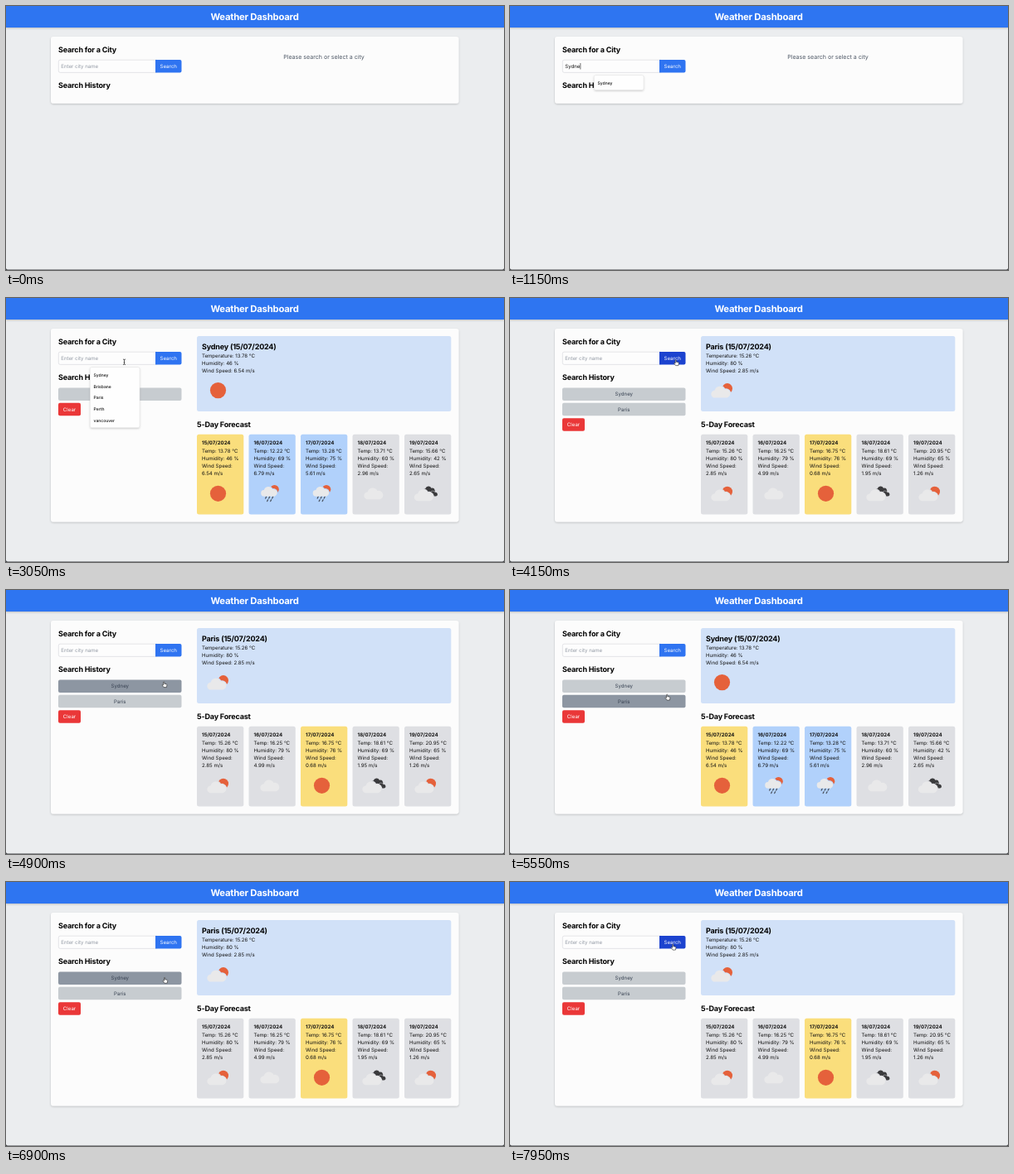
These frames come from a looping animation (600 by 319 pixels, 8 s). An HTML page:

```html
<!DOCTYPE html>
<html lang="en">
<head>
<meta charset="utf-8">
<title>Weather Dashboard</title>
<style>
  html, body { margin: 0; width: 100%; height: 100%; overflow: hidden; background: #3a3c40; }
  svg { display: block; width: 100vw; height: 100vh; }
  text { font: 400 6.1px Inter, Roboto, sans-serif; fill: #111; text-rendering: geometricPrecision; white-space: pre; }
  .title { font-size: 11.3px; font-weight: 700; fill: #fff; letter-spacing: -.02em; }
  .head { font-size: 9px; font-weight: 700; fill: #000; letter-spacing: -.02em; }
  .day { font-weight: 700; }
  .hint { font-size: 7.05px; fill: #4b5563; }
  .placeholder { fill: #9299a4; }
  .light { fill: #fff; }
  .past { fill: #374151; }
  .option { font-size: 5px; font-weight: 500; }
  .mid { text-anchor: middle; }
</style>
</head>
<body>
<svg viewBox="0 0 600 319" preserveAspectRatio="none">
  <defs>
    <filter id="soft" x="-10%" y="-10%" width="120%" height="130%">
      <feDropShadow dx="0" dy="1" stdDeviation="1" flood-opacity=".2"/>
    </filter>
    <path id="cloud" d="M-7.5 7a4.5 4.5 0 0 1-.3-9A6.3 6.3 0 0 1 4-3.2 5.2 5.2 0 0 1 7 7Z"/>
  </defs>
  <path d="M0 0H600V316.500Q600 318.500 598 318.500H2Q0 318.500 0 316.500Z" fill="#ebedef"/>
  <rect width="600" height="26" fill="#2f74f1" filter="url(#soft)"/>
  <text class="title mid" x="299.500" y="17.400">Weather Dashboard</text>
  <g id="scene"></g>
  <g id="caret"><rect y="69" width=".6" height="7.500" fill="#111"/></g>
  <g id="menu"></g>
  <g id="pointer">
    <path data-kind="arrow" d="M-2.500-4V4L-.7 2.400.6 5.200 1.800 4.700.6 2H3Z" fill="#000" stroke="#fff" stroke-width=".6"/>
    <path data-kind="beam" d="M-1.500-3Q0-3 0-2Q0-3 1.500-3M0-2V2.500M-1.500 3.500Q0 3.500 0 2.500Q0 3.500 1.500 3.500M-.8.8H.8" fill="none" stroke="#222" stroke-width=".7"/>
    <path data-kind="hand" d="M-1.300.5V-3Q-.8-3.900-.2-3V-.8L2.300-.3Q3.100 0 2.900 1L2.400 3.600H-.9L-2.900.9Q-2.700-.3-1.300.8Z" fill="#fff" stroke="#222" stroke-width=".6"/>
  </g>
</svg>
<script>
const LOOP = 8000;
const $ = id => document.getElementById(id);
const CITIES = ['Sydney', 'Brisbane', 'Paris', 'Perth', 'vancouver'];

// Each day: temperature, humidity, wind, sky
const WEATHER = {
  Sydney: [['13.78', 46, '6.54', 'sun'], ['12.22', 69, '6.79', 'rain'], ['13.28', 75, '5.61', 'rain'],
           ['13.71', 60, '2.96', 'cloud'], ['15.66', 42, '2.65', 'broken']],
  Paris: [['15.26', 80, '2.85', 'few'], ['16.25', 79, '4.99', 'cloud'], ['16.75', 76, '0.68', 'sun'],
          ['18.61', 69, '1.95', 'broken'], ['20.95', 65, '1.26', 'few']]
};
const RESULTS = [[0, null], [2200, 'Sydney'], [4000, 'Paris'], [5200, 'Sydney'], [6420, 'Paris']];
const TYPING = [
  { word: 'Sydney', focus: 700, start: 960, step: 45, end: 2200 },
  { word: 'Paris', focus: 2940, start: 3110, step: 60, end: 4000 }
];
// time, x, y
const PATH = [[50, 602, 316], [650, 140, 76], [1400, 140, 76], [1850, 196, 77], [2350, 196, 77], [2850, 142.5, 77],
  [3520, 142.5, 77], [3820, 200.5, 78], [4300, 200.5, 78], [4800, 191, 114], [5300, 191, 114], [5700, 189.5, 136.5],
  [6550, 189.5, 136.5], [7500, 197, 78.5], [LOOP, 197, 78.5]];
const HIDDEN = [[0, 50], [960, 1400], [3110, 3520]];

const text = (x, y, str, cls = '') => `<text x="${x}" y="${y}" class="${cls}">${str}</text>`;
const box = (x, y, w, h, fill, r = 2.5, extra = '') =>
  `<rect x="${x}" y="${y}" width="${w}" height="${h}" rx="${r}" fill="${fill}" ${extra}/>`;
const sun = (x, y, r) => `<circle cx="${x}" cy="${y}" r="${r}" fill="#e5613b"/>`;
const cloud = (x, y, scale, fill, edge) =>
  `<use href="#cloud" transform="translate(${x} ${y}) scale(${scale})" fill="${fill}" stroke="${edge}" stroke-width="2" style="paint-order:stroke"/>`;

function icon(kind, x, y, bg) {
  const pale = '#e9e9ea';
  const drops = [[-5, 4], [-1, 4], [3, 4], [-3, 7.5], [1, 7.5]]
    .map(([dx, dy]) => `M${dx + .6} ${dy}l-.9 1.800`).join('');
  const parts = {
    sun: () => sun(0, 0, 9.6),
    few: () => sun(6.3, -2.3, 6.2) + cloud(-1, 2, 1, pale, bg),
    cloud: () => cloud(.5, 0, 1, pale, 'none'),
    broken: () => cloud(4.5, -4.5, .62, '#3b3b3d', 'none') + cloud(9.5, 0, .45, '#3b3b3d', bg) + cloud(-1.5, 2, 1, pale, bg),
    rain: () => sun(5.5, -5, 5.3) + cloud(-.5, -2.5, .85, pale, bg) +
      `<path d="${drops}" stroke="#444a55" stroke-width="1.200" stroke-linecap="round"/>`
  };
  return `<g transform="translate(${x} ${y})">${parts[kind]()}</g>`;
}

function dayCard([temp, humidity, wind, sky], i) {
  const x = 230 + 62.5 * i;
  const bg = { sun: '#fade7c', rain: '#b1d1fb' }[sky] || '#dedfe3';
  const lines = [`${15 + i}/07/2024`, `Temp: ${temp} °C`, `Humidity: ${humidity} %`, 'Wind Speed:', `${wind} m/s`];
  return box(x, 164.8, 56.3, 96.7, bg) +
    lines.map((line, n) => text(x + 6, 177.3 + 9.25 * n, line, n ? '' : 'day')).join('') +
    icon(sky, x + 25.5, 236.3, bg);
}

function report(city) {
  const [temp, humidity, wind, sky] = WEATHER[city][0];
  const bg = '#d1e1f8';
  return box(230, 46, 306.3, 91, bg) +
    text(236, 61.8, `${city} (15/07/2024)`, 'head') +
    [`Temperature: ${temp} °C`, `Humidity: ${humidity} %`, `Wind Speed: ${wind} m/s`]
      .map((line, n) => text(236, 71.6 + 9.25 * n, line)).join('') +
    icon(sky, 255.5, 111.6, bg) +
    text(230, 155.8, '5-Day Forecast', 'head') +
    WEATHER[city].map(dayCard).join('');
}

function scene({ city, past, typed, hover }) {
  const bars = past.map((name, i) =>
    box(63, 108.4 + 18.4 * i, 148.5, 15.5, hover === 'past' + i ? '#8d96a2' : '#c7ccd0', 2) +
    text(137.3, 118.4 + 18.4 * i, name, 'past mid')).join('');
  const clearY = 108.4 + 18.4 * past.length;
  return box(54, 37, 491.5, city ? 233.5 : 80.7, '#fcfcfc', 3, 'filter="url(#soft)"') +
    text(63, 55.6, 'Search for a City', 'head') +
    box(63.3, 65.2, 120, 15.2, '#fdfdfd', 2, 'stroke="#d3d6da" stroke-width=".6"') +
    `<path d="M180 65H209.500Q211.500 65 211.500 67V78.600Q211.500 80.600 209.500 80.600H180Z" fill="${hover === 'search' ? '#1c43cf' : '#2f74f1'}"/>` +
    text(195.7, 75, 'Search', 'light mid') +
    `<g id="field">${text(66.3, 75, typed || 'Enter city name', typed ? '' : 'placeholder')}</g>` +
    text(63, 99.4, 'Search History', 'head') + bars +
    (city ? box(63, clearY, 27, 15.5, '#ea3738', 2) + text(76.5, clearY + 10, 'Clear', 'light mid') + report(city)
          : text(383, 63.6, 'Please search or select a city', 'hint mid'));
}

function menu(options) {
  return options.length
    ? box(101.3, 83.5, 59.7, 4.2 + 13.8 * options.length, '#fefefe', 2, 'filter="url(#soft)" stroke="#d8d8d8" stroke-width=".4"') +
      options.map((name, i) => text(105.6, 94.8 + 13.8 * i, name, 'option')).join('')
    : '';
}

function pointerAt(t) {
  const next = PATH.findIndex(p => p[0] > t);
  if (next < 1) return PATH[0].slice(1);
  const [t0, x0, y0] = PATH[next - 1], [t1, x1, y1] = PATH[next];
  const k = (t - t0) / (t1 - t0), ease = k * k * (3 - 2 * k);
  return [x0 + (x1 - x0) * ease, y0 + (y1 - y0) * ease];
}

function hoverAt(x, y, past) {
  if (x < 63 || x > 211.5) return '';
  if (y > 65 && y < 81) return x < 180 ? 'field' : 'search';
  const row = Math.floor((y - 108.4) / 18.4);
  return row >= 0 && row < past && (y - 108.4) % 18.4 < 15.5 ? 'past' + row : '';
}

let lastScene = '', lastMenu = '';
function render(t) {
  const city = RESULTS.filter(r => r[0] <= t).pop()[1];
  const past = ['Sydney', 'Paris'].slice(0, t < 2200 ? 0 : t < 4000 ? 1 : 2);
  const entry = TYPING.find(e => t >= e.focus && t < e.end);
  const count = entry ? Math.max(0, Math.min(entry.word.length, Math.floor((t - entry.start) / entry.step) + 1)) : 0;
  const typed = count ? entry.word.slice(0, count) : '';
  const hidden = HIDDEN.some(([a, b]) => t >= a && t < b);
  const [x, y] = pointerAt(t);
  const hover = t < 50 ? '' : hoverAt(x, y, past.length);

  const html = scene({ city, past, typed, hover });
  if (html !== lastScene) $('scene').innerHTML = lastScene = html;

  const opened = entry && (count || entry === TYPING[1]) && count < entry.word.length;
  const list = menu(opened ? CITIES.filter(c => c.toLowerCase().startsWith(typed.toLowerCase())) : []);
  if (list !== lastMenu) $('menu').innerHTML = lastMenu = list;

  const lastKey = entry && (count ? entry.start + (count - 1) * entry.step : entry.focus);
  const caretOn = entry && (count || entry === TYPING[0]) && (t - lastKey) % 1000 < 500;
  $('caret').style.display = caretOn ? '' : 'none';
  const width = typed ? $('field').firstChild.getComputedTextLength() : 0;
  $('caret').setAttribute('transform', `translate(${66.5 + width} 0)`);

  const kind = hover === 'field' ? 'beam' : hover ? 'hand' : 'arrow';
  $('pointer').style.display = hidden ? 'none' : '';
  $('pointer').setAttribute('transform', `translate(${x} ${y})`);
  for (const shape of $('pointer').children) shape.style.display = shape.dataset.kind === kind ? '' : 'none';
}

const begin = performance.now();
function tick() {
  render((performance.now() - begin) % LOOP);
  requestAnimationFrame(tick);
}
tick();
</script>
</body>
</html>
```
